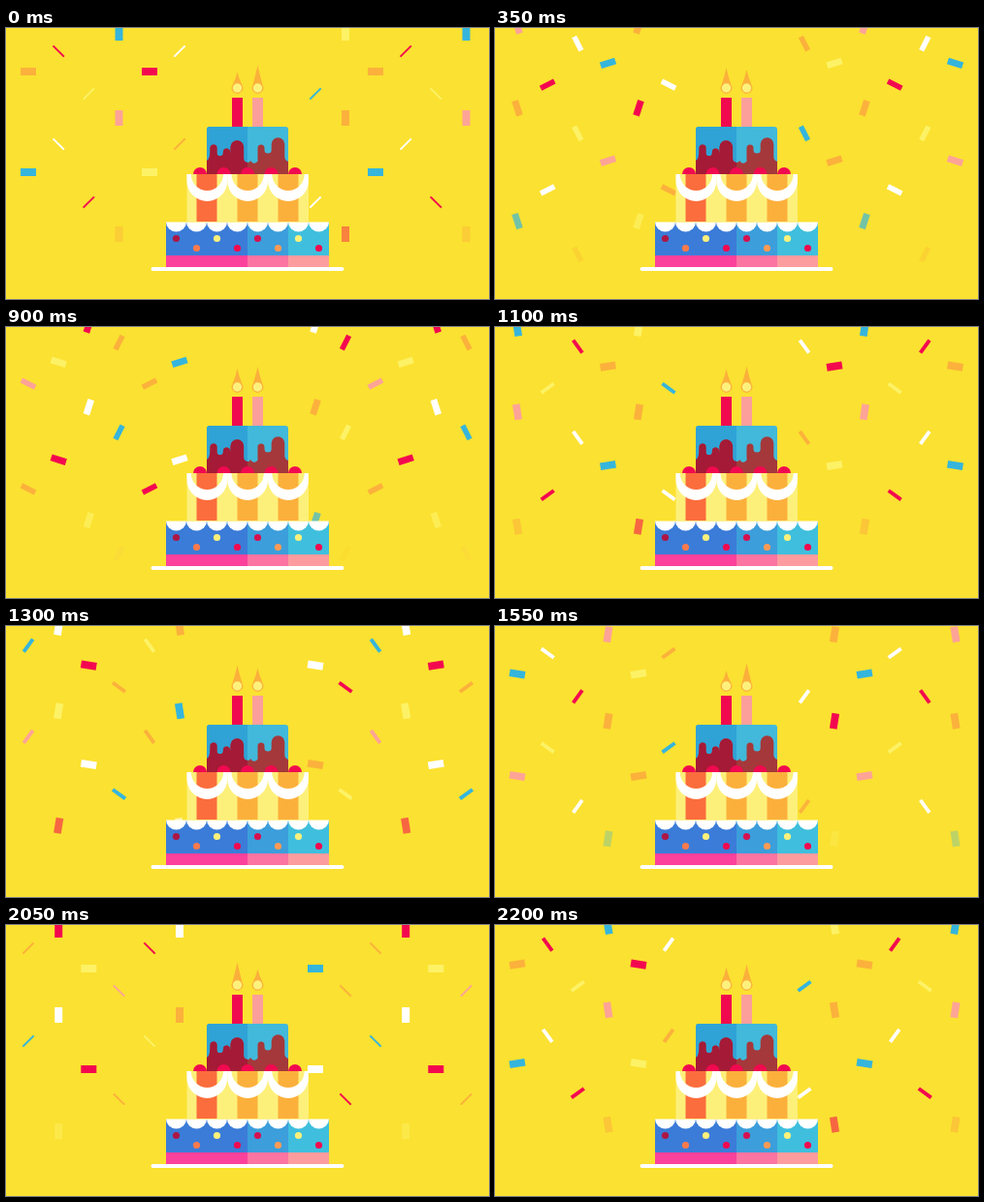
These frames come from a looping animation (498 by 280 pixels, 2250 ms). An HTML page:

```html
<!DOCTYPE html>
<html lang="en">
<head>
<meta charset="utf-8">
<title>Birthday cake</title>
<style>
  html, body { margin: 0; width: 100%; height: 100%; overflow: hidden; background: #fbe131; }
  svg { display: block; width: 100vw; height: 100vh; }
</style>
</head>
<body>
<svg id="stage" viewBox="0 0 498 280">
  <rect width="498" height="280" fill="#fbe131"/>
  <g id="confetti"></g>

  <g id="candles">
    <rect x="233" y="72" width="11" height="31" fill="#f1094f"/>
    <rect x="254" y="72" width="11" height="31" fill="#fc9f9b"/>
    <path id="flameL" fill="#fbb03b"/>
    <path id="flameR" fill="#fbb03b"/>
    <circle cx="238.5" cy="62" r="4.7" fill="#fdf17c"/>
    <circle cx="259.5" cy="62" r="4.7" fill="#fdf17c"/>
  </g>

  <clipPath id="leftHalf"><rect x="150" y="90" width="99" height="170"/></clipPath>
  <g id="topTier">
    <path d="M207 151V105q0-3 3-3H288q3 0 3 3V151Z" fill="#42b9da"/>
    <path d="M207 151V105q0-3 3-3H288V151Z" fill="#2fa3d6" clip-path="url(#leftHalf)"/>
    <path id="icing" fill="#a5383a"/>
    <path id="icingL" fill="#a51a36" clip-path="url(#leftHalf)"/>
  </g>
  <g id="cherries" fill="#f1094f"></g>
  <g id="midTier"></g>
  <g id="lowTier"></g>
  <rect x="149.500" y="247" width="199" height="4" rx="2" fill="#fff"/>
</svg>
<script>
const LOOP = 2250, STEP = 50;
const C = {
  orange: '#fbb13c', blue: '#35b5dc', pink: '#fda497',
  red: '#f3084f', white: '#ffffff', cream: '#fdf266'
};
const byId = id => document.getElementById(id);

function add(parent, tag, attrs) {
  const el = document.createElementNS('http://www.w3.org/2000/svg', tag);
  for (const key in attrs) el.setAttribute(key, attrs[key]);
  parent.appendChild(el);
  return el;
}
const box = (parent, x, y, width, height, fill) =>
  add(parent, 'rect', { x, y, width, height, fill });

function buildCake() {
  const icing = 'M207 151V137Q210.500 136 210.500 126V124a3.500 3.500 0 0 1 7 0V129' +
    'a3.200 3.200 0 0 0 6.400 0V128a3.500 3.500 0 0 1 7 0Q231.500 131 231.500 124' +
    'V123a6.800 6.800 0 0 1 13.600 0V135a4 4 0 0 0 7.400 2' +
    'a3.600 3.600 0 0 0 7 -2V124a3.500 3.500 0 0 1 7 0V126a3.600 3.600 0 0 0 7.200 0' +
    'V120a6.800 6.800 0 0 1 13.600 0V133Q287.500 137 291 138V151Z';
  byId('icing').setAttribute('d', icing);
  byId('icingL').setAttribute('d', icing);

  for (let i = 0; i < 5; i++) {
    const x = 200 + i * 24.5;
    add(byId('cherries'), 'path', { d: `M${x - 7} 151a7 7 0 0 1 14 0Z` });
  }

  const mid = byId('midTier');
  box(mid, 186.5, 151, 125.5, 49, '#fdf07a');
  ['#fb6d3c', '#fcb03c', '#fcb03c'].forEach((fill, i) => box(mid, 196.5 + i * 42, 151, 21, 49, fill));
  for (let i = 0; i < 3; i++) {
    const x = 186.5 + i * 41.8;
    add(mid, 'path', {
      d: `M${x} 151V158a20.900 20.900 0 0 0 41.800 0V151h-4.200a16.700 17 0 0 1 -33.400 0Z`,
      fill: '#fff'
    });
  }

  const low = byId('lowTier');
  [[165, 84, '#3b7cd8', '#fb419c'], [249, 42, '#3c9edb', '#fb74a2'], [291, 42, '#3fbfdd', '#fc9c9f']]
    .forEach(([x, w, top, base]) => {
      box(low, x, 201, w, 35, top);
      box(low, x, 235, w, 12, base);
    });
  for (let i = 0; i < 8; i++) {
    add(low, 'path', { d: `M${165 + i * 21} 200.500a10.500 10 0 0 0 21 0Z`, fill: '#fff' });
  }
  const dots = ['#ad1745', '#fb7a4c', '#fdf17c', '#f1094f', '#d61150', '#fc9a55', '#fdf17c', '#f1094f'];
  dots.forEach((fill, i) =>
    add(low, 'circle', { cx: 175.5 + i * 21, cy: i % 2 ? 227.5 : 217.5, r: 3.6, fill }));
}

// Each column: x, head start in ticks, spin direction, colours from newest to oldest
const edge = [
  [0, 0, 1, 'orange blue pink'],
  [31.2, -5, -1, 'red white cream'],
  [62.3, 5, -1, 'cream red white'],
  [93.5, -10, 1, 'blue pink orange']
];
const columns = [
  ...edge.map(([x, ...rest]) => [23 + x, ...rest]),
  [148, 0, -1, 'red cream orange'],
  [179, -5, 1, 'white orange blue'],
  [319, 5, -1, 'blue white orange'],
  [350, -10, 1, 'cream orange red'],
  ...edge.map(([x, start, spin, colours]) => [381 + x, start, -spin, colours])
];

const pieces = columns.flatMap(([x, start, spin, colours]) =>
  colours.split(' ').map((name, i) => ({
    x, spin, start: start + i * 20,
    el: add(byId('confetti'), 'rect', { x: -8, width: 16, fill: C[name] })
  })));

function drawPiece(p, tick) {
  const age = (((p.start + tick + 20) % 60) + 60) % 60 - 20;
  const y = 45 + 4.4 * age + 0.04 * age * age;
  const angle = 9 * age * p.spin;
  const h = 2 + 6 * Math.abs(Math.cos(angle * Math.PI / 90));
  p.el.setAttribute('transform', `translate(${p.x} ${y}) rotate(${angle})`);
  p.el.setAttribute('y', -h / 2);
  p.el.setAttribute('height', h);
  p.el.setAttribute('opacity', Math.max(0, Math.min(1, 1 - (age - 25.5) / 8)));
}

function drawFlame(id, x, tip) {
  byId(id).setAttribute('d',
    `M${x} ${tip}Q${x + 1.5} ${tip + 7} ${x + 5} 59A5.800 5.800 0 1 1 ${x - 5} 59Q${x - 1.5} ${tip + 7} ${x} ${tip}Z`);
}

function render(now) {
  const step = Math.floor((now % LOOP) / STEP);
  // 60 ticks per loop, with the first pose held for two steps
  const tick = Math.max(0, Math.round((step - 1) * 15 / 11));
  pieces.forEach(p => drawPiece(p, tick));
  const sway = 4 * Math.cos((tick - 0.9) * Math.PI / 5);
  drawFlame('flameL', 238.5, 42 + sway);
  drawFlame('flameR', 259.5, 42 - sway);
}

buildCake();
const begin = performance.now();
function loop() {
  render(performance.now() - begin);
  requestAnimationFrame(loop);
}
loop();
</script>
</body>
</html>
```
